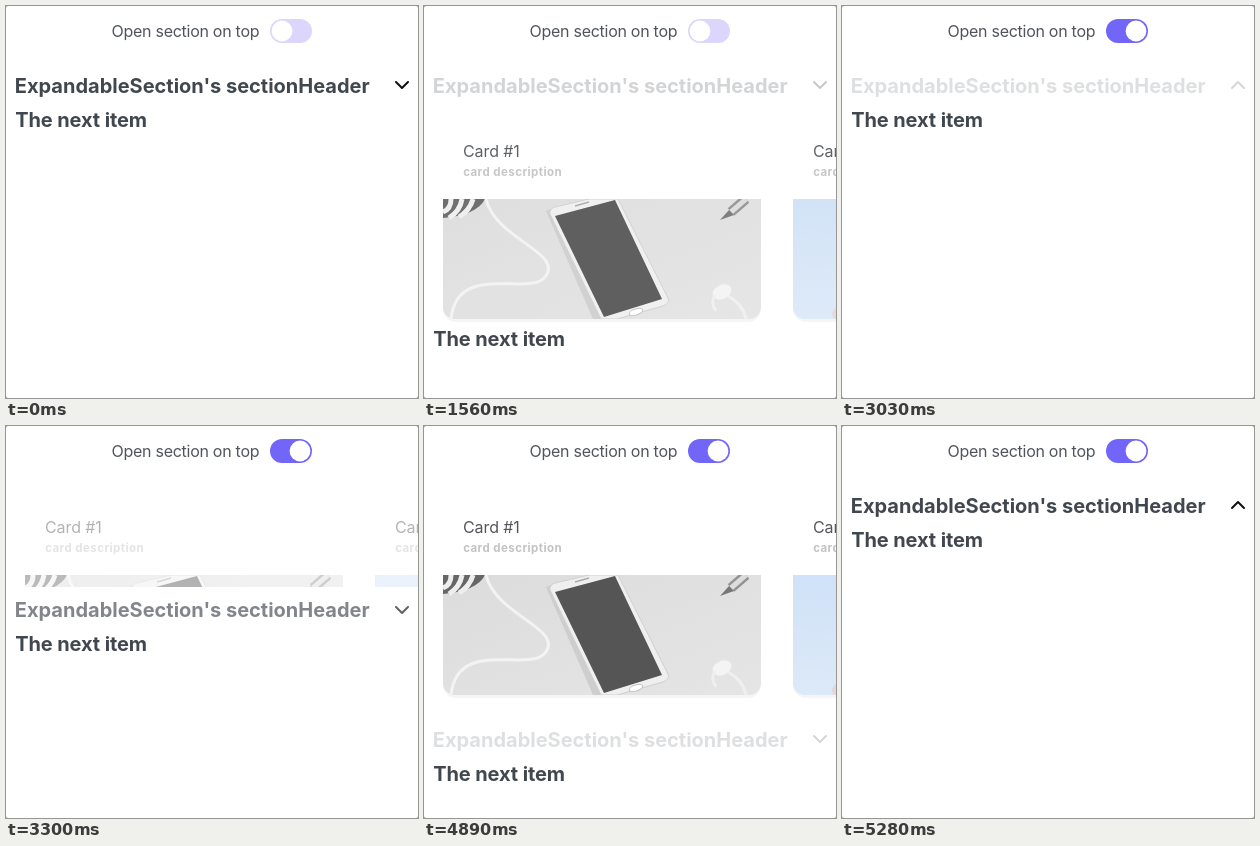
An HTML page for the animation above (6300 ms loop, 412 by 392 pixels).

```html
<!DOCTYPE html>
<html lang="en">
<head>
<meta charset="utf-8">
<title>Expandable section</title>
<style>
  html, body { margin: 0; width: 100%; height: 100%; overflow: hidden; background: #8a8a8a; }
  svg { display: block; width: 412px; height: 392px; }
  text { font-family: Inter, "Liberation Sans", sans-serif; white-space: pre; }
  .label { font-size: 16px; letter-spacing: -.27px; fill: #50555c; }
  .head { font-size: 20px; font-weight: 700; fill: #40474e; }
  .title { font-size: 16px; letter-spacing: -.1px; fill: #53565a; }
  .desc { font-size: 11.5px; font-weight: 700; letter-spacing: .44px; fill: #c3c3c3; }
  #next { letter-spacing: -.1px; }
</style>
</head>
<body>
<svg viewBox="0 0 412 392">
  <defs>
    <clipPath id="reveal"><rect id="window" width="412" height="0"/></clipPath>
    <clipPath id="photo"><path d="M0 0H318V108a12 12 0 0 1-12 12H12A12 12 0 0 1 0 108Z"/></clipPath>
    <linearGradient id="desk" x2="1" y2="1">
      <stop offset="0" stop-color="#dcdcdc"/><stop offset="1" stop-color="#e5e5e5"/>
    </linearGradient>
    <linearGradient id="sky" x2=".15" y2="1">
      <stop offset="0" stop-color="#d0e2f7"/><stop offset="1" stop-color="#dce9f8"/>
    </linearGradient>
  </defs>

  <rect width="412" height="392" rx="2" fill="#fff"/>

  <text class="label" x="105.5" y="31">Open section on top</text>
  <rect id="track" x="264" y="13" width="42" height="24" rx="12"/>
  <circle id="knob" cy="25" r="10.4" fill="#fff"/>

  <g clip-path="url(#reveal)">
    <g id="content">
      <g>
        <text class="title" x="39" y="51.2">Card #1</text>
        <text class="desc" x="39.2" y="69.5">card description</text>
        <rect x="19" y="180" width="318" height="36" rx="13" fill="#f5f5f5"/>
        <g transform="translate(19 93)" clip-path="url(#photo)">
          <rect width="318" height="120" fill="url(#desk)"/>
          <path d="M0 0H42Q34 16 0 19Z" fill="#666"/>
          <path d="M8 0Q8 10 0 13M19 0Q17 12 6 19M30 0Q27 11 16 18" fill="none" stroke="#eee" stroke-width="5"/>
          <path d="M43 0C52 40 122 54 102 78C86 98 14 62 8 120" fill="none" stroke="#f3f3f3" stroke-width="3"/>
          <path d="M103 12L112 8L165 120H150Z" fill="#cecece"/>
          <path d="M107 15Q106 10 112 8L146 0H175L225 99Q227 104 220 107L174 120H158Z" fill="#efefef" stroke="#cfcfcf"/>
          <path d="M112 17L172 1L219 100L161 118Z" fill="#555"/>
          <path d="M132 7l14-4" stroke="#aaa" stroke-width="1.5"/>
          <ellipse cx="193" cy="113" rx="7" ry="3" transform="rotate(-18 193 113)" fill="#fff" stroke="#bbb"/>
          <path d="M303 0L288 13" stroke="#929292" stroke-width="10"/>
          <path d="M303 0L288 13" stroke="#dcdcdc" stroke-width="5"/>
          <path d="M286 11L291 16L277 21Z" fill="#777"/>
          <ellipse cx="279" cy="93" rx="10" ry="7" transform="rotate(-25 279 93)" fill="#f4f4f4"/>
          <path d="M272 96Q267 104 273 112M285 97Q300 105 303 120" fill="none" stroke="#efefef" stroke-width="3"/>
        </g>
      </g>
      <g transform="translate(350)">
        <text class="title" x="39" y="51.2">Card #2</text>
        <text class="desc" x="39.2" y="69.5">card description</text>
        <rect x="19" y="180" width="318" height="36" rx="13" fill="#f5f5f5"/>
        <g transform="translate(19 93)" clip-path="url(#photo)">
          <rect width="318" height="120" fill="url(#sky)"/>
          <circle cx="45" cy="115" r="6" fill="#e6d6da"/>
        </g>
      </g>
    </g>
  </g>

  <g id="header">
    <text class="head" x="8.8" y="86.5">ExpandableSection's sectionHeader</text>
    <path id="chevron" fill="none" stroke="#111" stroke-width="2" stroke-linecap="round" stroke-linejoin="round"/>
  </g>
  <text id="next" class="head" x="9.2" y="120.5">The next item</text>
</svg>

<script>
const LOOP = 6300, STEP = 30;
const FULL = 234, DIM = 0.17;
const SLIDE = 300, FADE = 250, SWITCH_AT = 2430, SWITCH = 180;

// Each tap: finger down, start of the layout change, resulting state
const taps = [
  { down: 480, up: 614, open: true },
  { down: 1440, up: 1508, open: false },
  { down: 3030, up: 3159, open: true },
  { down: 4890, up: 4988, open: false }
];

const el = id => document.getElementById(id);
const set = (id, attrs) => {
  for (const k in attrs) el(id).setAttribute(k, attrs[k]);
};
const clamp = x => Math.min(1, Math.max(0, x));
const quad = x => x < .5 ? 2 * x * x : 1 - 2 * (1 - x) ** 2;

// cubic-bezier(.42, 0, .58, 1)
function ease(x) {
  if (x <= 0) return 0;
  if (x >= .96) return 1;
  let lo = 0, hi = 1, s = .5;
  for (let i = 0; i < 24; i++) {
    s = (lo + hi) / 2;
    const bx = 3 * (1 - s) * s * (.42 * (1 - s) + .58 * s) + s ** 3;
    if (bx < x) lo = s; else hi = s;
  }
  return s * s * (3 - 2 * s);
}

function draw(ms) {
  const t = Math.floor(ms % LOOP / STEP) * STEP;
  let progress = 0, open = false, glow = 1;
  for (const tap of taps) {
    if (t < tap.down) break;
    glow = DIM + (1 - DIM) * quad(clamp((t - tap.up - 5) / FADE));
    if (t < tap.up) break;
    open = tap.open;
    const p = ease((t - tap.up) / SLIDE);
    progress = open ? p : 1 - p;
  }

  const onTop = t >= SWITCH_AT;
  const shift = FULL * progress;
  const top = onTop ? 56 : 100;
  const pointsUp = open !== onTop;

  set("track", { fill: onTop ? "#7266f8" : "#ddd6fc" });
  set("knob", { cx: 276 + 18 * ease((t - SWITCH_AT + STEP) / (SWITCH + STEP)) });
  set("window", { y: top, height: shift });
  set("content", { transform: `translate(0 ${top})`, opacity: progress });
  set("header", { transform: `translate(0 ${onTop ? shift : 0})`, opacity: glow });
  set("chevron", { d: pointsUp ? "M390 82l6-6 6 6" : "M390 76l6 6 6-6" });
  set("next", { transform: `translate(0 ${shift})` });
}

const start = performance.now();
function tick() {
  draw(performance.now() - start);
  requestAnimationFrame(tick);
}
tick();
</script>
</body>
</html>
```
